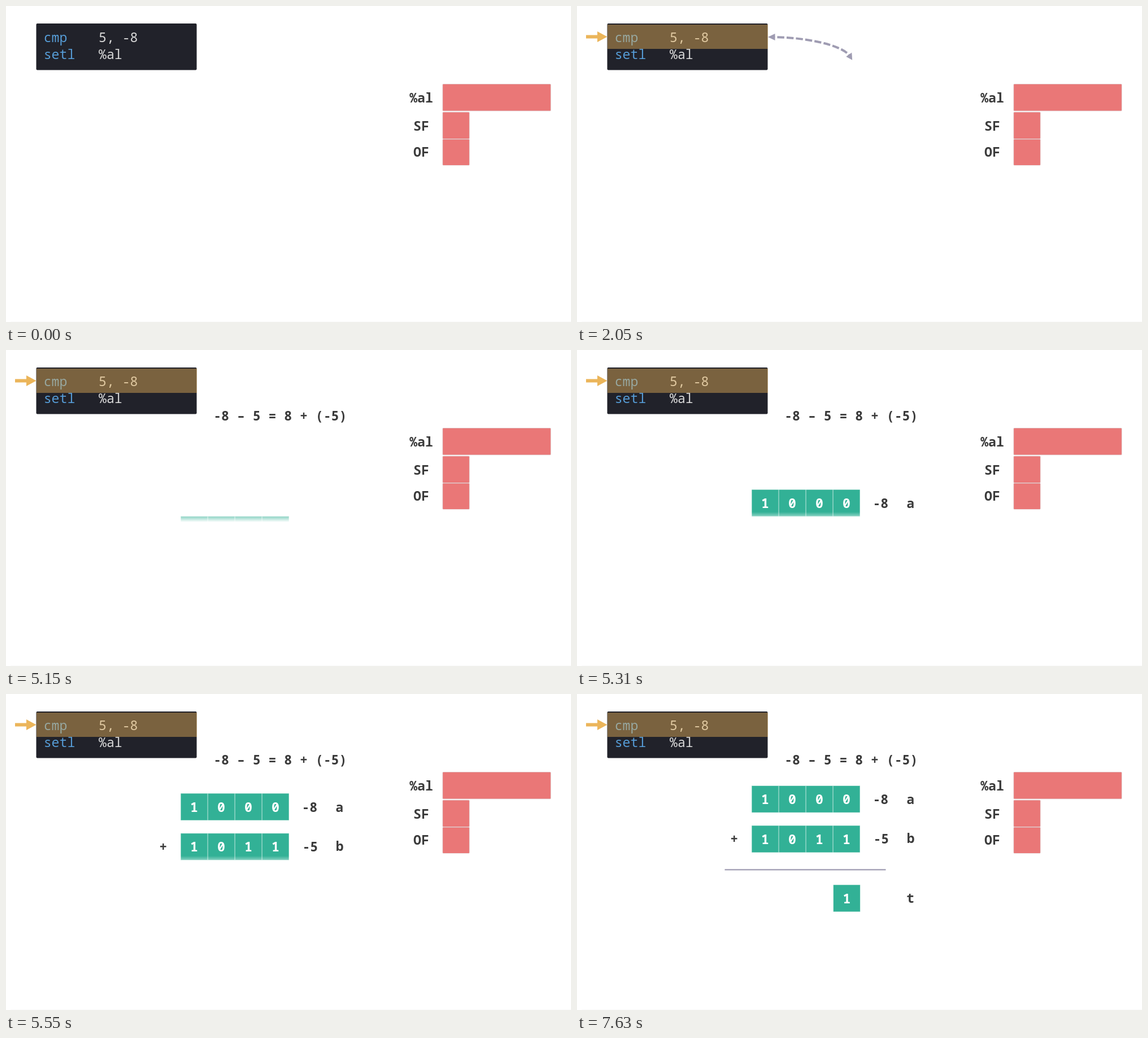
Recreate the animation shown at these times as an HTML page with a canvas. Size 1000 px wide and 560 px high, loop 8 s.

```html
<!DOCTYPE html>
<html lang="en">
<head>
<meta charset="utf-8">
<title>cmp and setl</title>
<style>
html, body { margin: 0; width: 100%; height: 100%; overflow: hidden; background: #fff; }
canvas { display: block; }
</style>
</head>
<body>
<canvas id="stage" width="1000" height="560"></canvas>
<script>
const ctx = document.getElementById('stage').getContext('2d');
const LOOP = 8000;
const FONT = '23.16px "Noto Sans Mono", "DejaVu Sans Mono", monospace';
const INK = '#3b3b3b', BLUE = '#569cd6', PALE = '#d9d9d9';
const GOLD = '#ebb55a', RED = '#ea7777', TEAL = '#32b196', GREY = '#9f9cb2';

function text(str, x, y, color = INK, align = 'center', weight = 'bold') {
  ctx.font = weight + ' ' + FONT;
  ctx.textAlign = align;
  ctx.fillStyle = color;
  ctx.fillText(str, x, y);
}

function box(x, y, w, h, color, radius = 0) {
  ctx.fillStyle = color;
  ctx.beginPath();
  ctx.roundRect(x, y, w, h, radius);
  ctx.fill();
}

function shape(points, color) {
  ctx.fillStyle = color;
  ctx.beginPath();
  points.forEach(([x, y]) => ctx.lineTo(x, y));
  ctx.fill();
}

function code() {
  box(53.5, 31, 284, 82.5, '#21222a', 2);
  const line = (op, args, y) => {
    text(op, 66.7, y, BLUE, 'left', 'normal');
    text(args, 164, y, PALE, 'left', 'normal');
  };
  line('cmp', '5, -8', 63.5);
  line('setl', '%al', 93.5);
}

function pointer() {
  ctx.globalAlpha = 0.44;
  box(54, 33, 284, 43, GOLD);
  ctx.globalAlpha = 1;
  shape([[16, 51.5], [36, 51.5], [36, 45], [53.5, 54.5], [36, 64], [36, 57.5], [16, 57.5]], GOLD);
}

function register(label, y, w, h, baseline) {
  text(label, 735, baseline);
  box(772.5, y, w, h, '#dcc4c6', 1.5);
  box(773.2, y + 0.7, w - 1.4, h - 1.4, RED, 1);
}

function link() {
  ctx.save();
  ctx.strokeStyle = GREY;
  ctx.lineWidth = 4;
  ctx.setLineDash([12.4, 4.1]);
  ctx.lineDashOffset = 6;
  ctx.beginPath();
  ctx.moveTo(344, 55);
  ctx.bezierCurveTo(400, 55, 468, 68, 482.5, 88);
  ctx.stroke();
  ctx.restore();
  shape([[338, 55], [350.5, 49], [350.5, 61]], GREY);
  shape([[487.2, 95.8], [476.3, 89.8], [486.3, 82.5]], GREY);
}

function bits(str, x, y) {
  const w = 48 * str.length;
  box(x, y, w, 48, '#b9e4da');
  [...str].forEach((bit, i) => {
    box(x + 48 * i + 0.6, y + 0.6, 46.9, 46.8, TEAL);
    text(bit, x + 48 * i + 24, y + 32.6, '#fff');
  });
}

function operands(shift) {
  ctx.save();
  ctx.beginPath();
  ctx.rect(255, 150, 360, 155);
  ctx.clip();
  ctx.translate(0, shift);
  bits('1000', 309, 162.3);
  text('-8', 537.3, 195);
  text('a', 590.3, 195);
  bits('1011', 309, 233);
  text('+', 278.3, 265);
  text('-5', 538.3, 265);
  text('b', 590.6, 264);
  ctx.restore();
  if (shift > 0) {
    // soft lower edge while the rows rise into view
    const fade = ctx.createLinearGradient(0, 287, 0, 305);
    fade.addColorStop(0, 'rgba(255,255,255,0)');
    fade.addColorStop(1, '#fff');
    ctx.fillStyle = fade;
    ctx.fillRect(255, 287, 360, 19);
  }
}

function riseShift(t) {
  const step = Math.floor((t - 5150) / 40);
  return Math.max(0, 132.3 - 11.86 * step);
}

function draw(t) {
  box(0, 0, 1000, 560, '#fff');
  box(8, 559, 992, 1, '#fafafa');
  code();
  register('%al', 138, 192, 48.2, 170.5);
  register('SF', 187.8, 48, 48, 220.5);
  register('OF', 235.8, 48, 46.8, 267);
  if (t >= 1050) pointer();
  if (t >= 2050 && t < 4100) link();
  if (t >= 3100) text('-8 – 5 = 8 + (-5)', 367.2, 125, INK, 'left');
  if (t >= 5150) operands(riseShift(t));
  if (t >= 6630) {
    box(261.5, 310.2, 285, 2.4, GREY);
    text('t', 590, 370);
  }
  if (t >= 7630) bits('1', 453.4, 338);
}

const start = performance.now();
function tick() {
  draw((performance.now() - start) % LOOP);
  requestAnimationFrame(tick);
}
tick();
</script>
</body>
</html>
```
